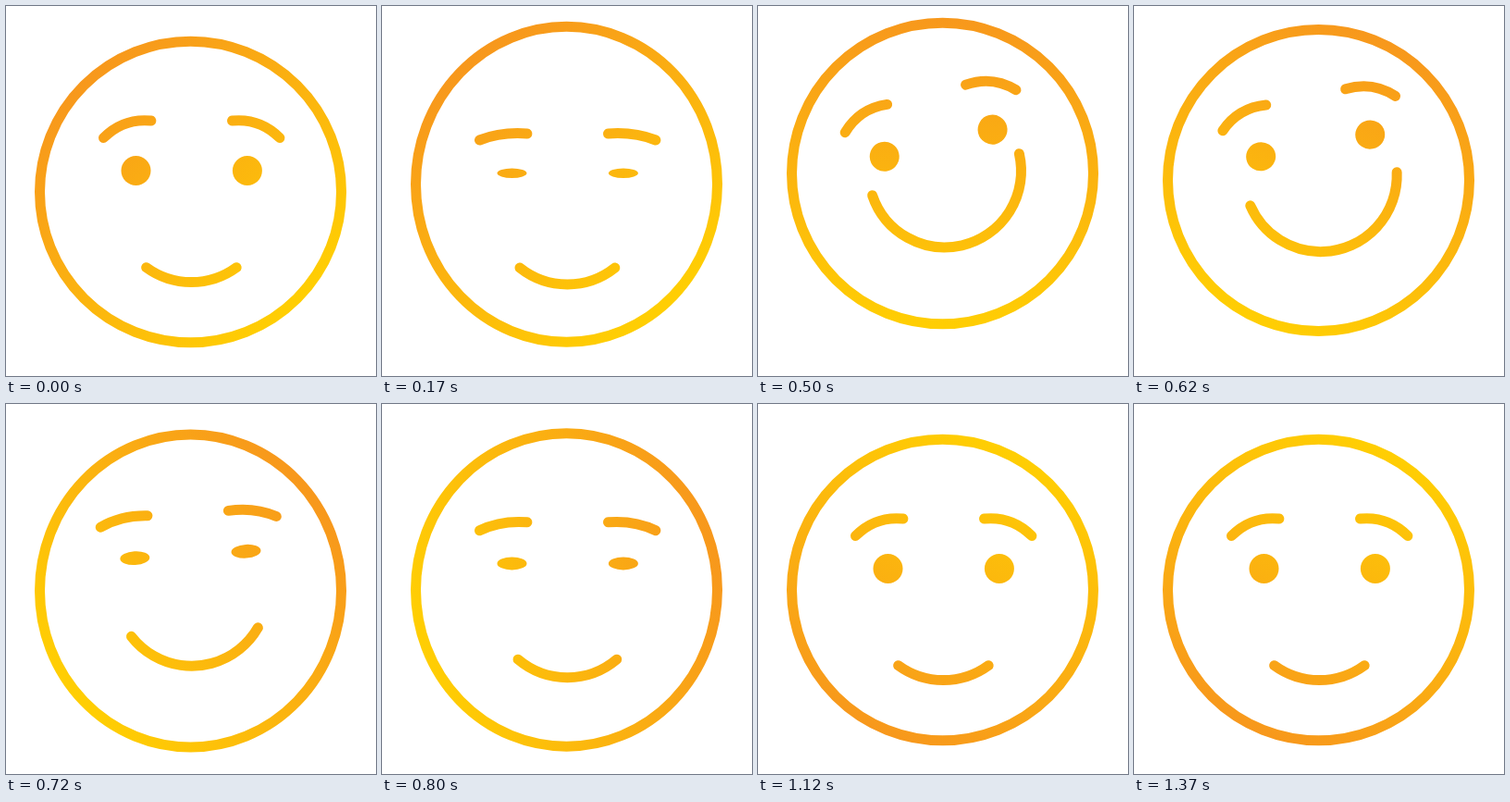
An HTML page with a canvas that plays this animation: 400x400 px, repeating every 1520 ms.

```html
<!DOCTYPE html>
<html>
<head>
<meta charset="utf-8">
<style>
  html, body { margin: 0; width: 100%; height: 100%; overflow: hidden; background: #fff; }
  canvas { display: block; }
</style>
</head>
<body>
<canvas id="stage" width="400" height="400"></canvas>
<script>
const ctx = document.getElementById('stage').getContext('2d');
const LOOP = 1520;
const HEAD_X = 199.5;
const FACE_X = 200.7;
const REST_Y = 201;
const TILT = 14;

const linear = u => u;
const smooth = u => u * u * (3 - 2 * u);
const easeOut = power => u => 1 - (1 - u) ** power;
const radians = degrees => degrees * Math.PI / 180;

// Progress from 0 to 1 between two times
function ramp(time, start, end, ease = smooth) {
  return ease(Math.min(1, Math.max(0, (time - start) / (end - start))));
}

function hump(time, start, end) {
  return Math.sin(Math.PI * ramp(time, start, end, linear));
}

function poseAt(time) {
  const outAndBack = (start, power, backEnd) =>
    ramp(time, start, 510, easeOut(power)) - ramp(time, 550, backEnd);
  return {
    head: outAndBack(130, 4.6, 720),
    face: outAndBack(174, 4.6, 925),
    mouth: outAndBack(174, 4.6, 873),
    smile: outAndBack(180, 3, 836),
    tilt: outAndBack(180, 3, 804),
    blink: ramp(time, 20, 130) - ramp(time, 170, 284)
         + ramp(time, 600, 770) - ramp(time, 770, 890),
    landing: hump(time, 640, 800),
    settle: -2.6 * hump(time, 800, 1000),
    shine: -43 + 45 * ramp(time, 120, 500, linear)
         + 100 * ramp(time, 550, 900, linear) + 103 * ramp(time, 900, 1000, linear)
  };
}

function goldGradient(centerY, degrees) {
  const dx = Math.sin(radians(degrees));
  const dy = -Math.cos(radians(degrees));
  const gradient = ctx.createLinearGradient(
    HEAD_X + dx * 180, centerY + dy * 180, HEAD_X - dx * 166, centerY - dy * 166);
  gradient.addColorStop(0, '#f7961d');
  gradient.addColorStop(1, '#ffce03');
  return gradient;
}

// Paths are built in face space; the gradient stays in stage space
function paint(method, x, y, degrees, buildPath) {
  ctx.beginPath();
  ctx.save();
  ctx.translate(x, y);
  ctx.rotate(radians(degrees));
  buildPath();
  ctx.restore();
  ctx[method]();
}

function addBrow(side, blink) {
  const outer = { x: side * 95.2, y: -58.5 + 2.5 * blink };
  const inner = { x: side * 43.8, y: -77 + 14 * blink };
  const bulge = 13 - 7 * blink;
  ctx.moveTo(outer.x, outer.y);
  ctx.quadraticCurveTo(
    (outer.x + inner.x) / 2 - side * -bulge * 0.34,
    (outer.y + inner.y) / 2 - bulge * 0.94,
    inner.x, inner.y);
}

function draw(time) {
  const pose = poseAt(time);
  const headY = REST_Y - 20 * pose.head + pose.landing + pose.settle;
  const faceY = REST_Y - 30.5 * pose.face + pose.settle;
  const mouthY = 216 - 37.7 * pose.mouth + 2.3 * pose.blink + pose.settle;
  const tilt = -TILT * pose.tilt;
  const spread = 36.2 + 51 * pose.smile + 2.3 * pose.blink;

  ctx.fillStyle = '#fff';
  ctx.fillRect(0, 0, 400, 400);
  ctx.fillStyle = ctx.strokeStyle = goldGradient(headY, pose.shine);
  ctx.lineWidth = 11;
  ctx.lineCap = 'round';

  paint('stroke', HEAD_X, headY, 0, () =>
    ctx.ellipse(0, 0, 163, 162.7 + 7.8 * pose.blink, 0, 0, Math.PI * 2));

  for (const side of [-1, 1]) {
    paint('fill', FACE_X, faceY, tilt, () =>
      ctx.ellipse(side * 60.2, -23 + 2.7 * pose.blink, 16, 16 - 10.8 * pose.blink,
        0, 0, Math.PI * 2));
    paint('stroke', FACE_X, faceY, tilt, () => addBrow(side, pose.blink));
  }

  paint('stroke', 200.4 + 1.5 * pose.tilt, mouthY, tilt * 1.13, () =>
    ctx.arc(0, 0, 82.6, radians(90 - spread), radians(90 + spread)));
}

const startTime = performance.now();
function tick() {
  draw((performance.now() - startTime) % LOOP);
  requestAnimationFrame(tick);
}
tick();
</script>
</body>
</html>
```
